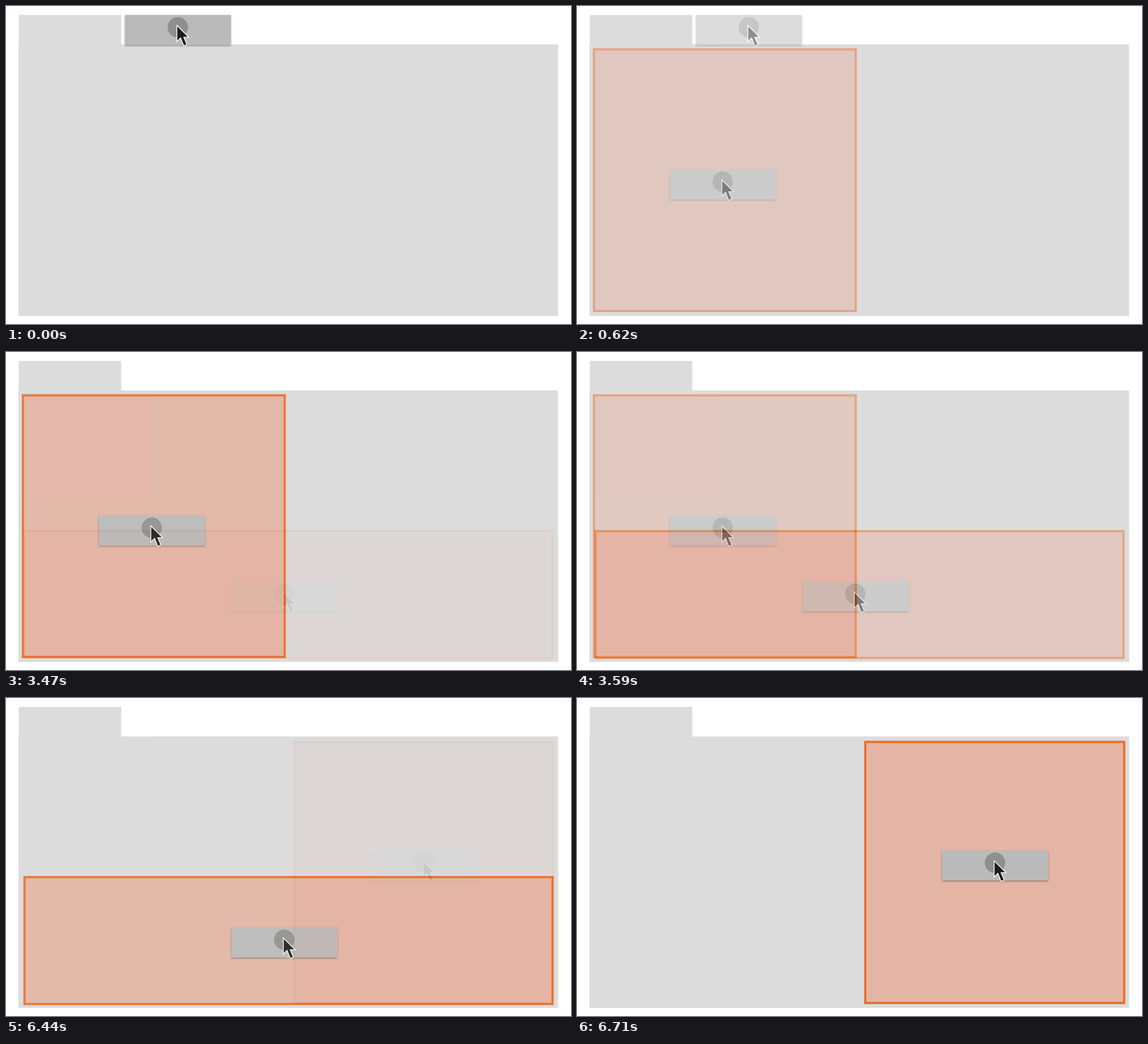
Animation of 998 by 561 pixels, one loop 8 s. Source, as an HTML page:

```html
<!DOCTYPE html>
<html lang="en">
<head>
<meta charset="utf-8">
<title>Drag and drop</title>
<style>
  html, body { margin: 0; width: 100%; height: 100%; overflow: hidden; background: #fff; }
  svg { display: block; width: 998px; height: 561px; }
  .zone { fill: #e4b5a5; stroke: #ea6f2d; stroke-width: 4; }
</style>
</head>
<body>
<svg viewBox="0 0 998 561">
  <defs>
    <filter id="shadow" x="-10%" y="-30%" width="120%" height="160%">
      <feDropShadow dx="0" dy="1.5" stdDeviation="1.5" flood-color="#000" flood-opacity=".38"/>
    </filter>
    <g id="base">
      <rect width="998" height="561" fill="#fff"/>
      <path d="M22.5 15.7H203.6V67.7H975.3V546.7H22V67.7H22.5Z" fill="#dcdcdc"/>
    </g>
    <g id="tab">
      <rect width="187.3" height="53" rx="1" fill="#bababa" filter="url(#shadow)"/>
      <circle cx="93.4" cy="21.8" r="18" fill="#8f8f8e"/>
      <path transform="translate(91.2 16.7)" fill="#1c1c1c" stroke="#fff" stroke-width="2.8" paint-order="stroke"
        d="M1.3 3.5V28.5L7.5 22.5L13.2 37L17.5 35.2L11.8 22L19.8 21.8Z"/>
    </g>
  </defs>
</svg>
<script>
  const LOOP = 8000, FADE = 300, STEPS = 10;

  // start time, tab position, zone as left, top, right, bottom
  const scenes = [
    { start: 0, tab: [210, 15.7] },
    { start: 500, tab: [164, 288.2], zone: [28, 74.5, 494.3, 540] },
    { start: 3470, tab: [398, 404.8], zone: [30.7, 314, 967.3, 541.8] },
    { start: 6440, tab: [645, 268.8], zone: [507.2, 75.5, 968.5, 540] }
  ];

  const svg = document.querySelector('svg');

  function add(parent, name, attrs = {}) {
    const el = document.createElementNS('http://www.w3.org/2000/svg', name);
    for (const key in attrs) el.setAttribute(key, attrs[key]);
    return parent.appendChild(el);
  }

  for (const { start, tab, zone } of scenes) {
    const scene = add(svg, 'g');
    add(scene, 'use', { href: '#base' });
    if (zone) {
      const [l, t, r, b] = zone;
      add(scene, 'rect', { class: 'zone', x: l + 2, y: t + 2, width: r - l - 4, height: b - t - 4 });
    }
    add(scene, 'use', { href: '#tab', x: tab[0], y: tab[1] });

    if (start) {
      // begin 1 ms early so each step has landed at its nominal time
      const from = (start - 1) / LOOP, to = (start - 1 + FADE) / LOOP;
      scene.animate([
        { opacity: 0, offset: 0 },
        { opacity: 0, offset: from, easing: `steps(${STEPS}, start)` },
        { opacity: 1, offset: to },
        { opacity: 1, offset: 1 }
      ], { duration: LOOP, iterations: Infinity });
    }
  }
</script>
</body>
</html>
```
